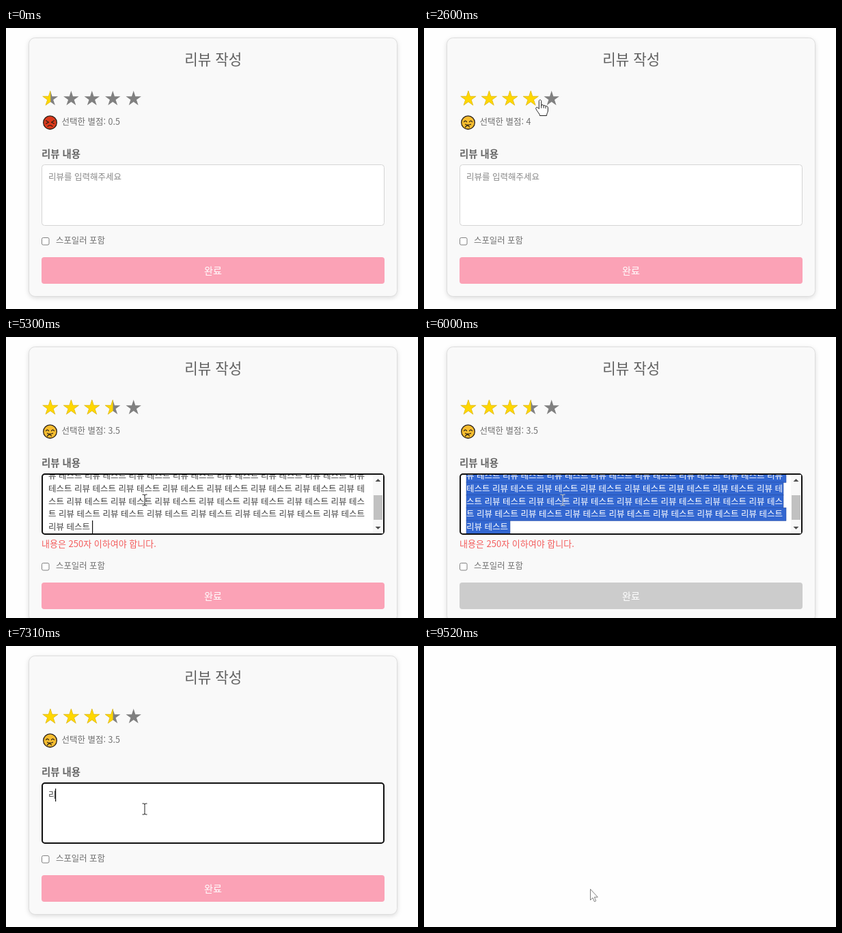
Animation of 603 by 412 pixels, one loop 9.62 s. Source, as an HTML page:

```html
<!DOCTYPE html>
<html lang="ko">
<meta charset="utf-8">
<title>리뷰 작성</title>
<style>
  html, body { margin: 0; width: 100%; height: 100%; overflow: hidden; background: #fefefe; }
  svg { display: block; }
  text { font: 12.5px "Noto Sans CJK KR", "Noto Sans CJK JP", "Noto Sans CJK", sans-serif; fill: #707070; white-space: pre; }
  #card { filter: drop-shadow(0 2px 3px #0002); }
  .line { fill: none; stroke: #2b2118; stroke-width: 1.2; stroke-linecap: round; stroke-linejoin: round; }
</style>
<svg width="603" height="412" viewBox="0 0 603 412">
  <defs>
    <clipPath id="inner"><rect x="54" y="202" width="498" height="86"/></clipPath>
    <clipPath id="rated"><rect id="ratedBox" x="50" y="88" height="30"/></clipPath>
    <path id="stars"/>
  </defs>
  <g id="form">
    <rect id="card" x="33.5" y="14.5" width="539" rx="9" fill="#f9f9f9" stroke="#ddd"/>
    <text x="303.3" y="54" text-anchor="middle" style="font-size:21.2px;fill:#606060">리뷰 작성</text>
    <use href="#stars" fill="#808080"/>
    <use href="#stars" fill="#ffd700" stroke="#e6bd10" stroke-width=".6" clip-path="url(#rated)"/>
    <g transform="translate(64.5 138.7)">
      <circle id="head" r="9.8" stroke="#2b2118" stroke-width="1.3"/>
      <path id="face" class="line"/>
    </g>
    <text id="score" x="81.5" y="141.5"></text>
    <text x="52" y="190" style="font-size:14.4px;font-weight:bold;fill:#666">리뷰 내용</text>
    <rect id="area" fill="#fff"/>
    <g clip-path="url(#inner)">
      <text id="typed" x="62" y="223"></text>
      <g id="pasted"></g>
      <rect id="caret" width="1.2" height="19" fill="#111"/>
    </g>
    <g id="scrollbar">
      <rect x="537" y="202" width="15" height="86" fill="#f8f8f8"/>
      <rect x="538" y="232" width="13" height="36" fill="#c1c1c1"/>
      <path d="M540.5 212l4-4 4 4zM540.5 278l4 4 4-4z" fill="#505050"/>
    </g>
    <text id="error" x="52" y="308" style="font-size:13px;fill:#f35c5c">내용은 250자 이하여야 합니다.</text>
    <g id="lower">
      <rect id="box" x="52.5" y="307.5" width="10.5" height="10.5" rx="2"/>
      <path id="tick" d="M55 313l2.3 2.5 4-5" fill="none" stroke="#fff" stroke-width="1.7"/>
      <text x="73" y="316" style="font-size:12.4px">스포일러 포함</text>
      <rect id="button" x="52" y="336" width="502" height="39" rx="4"/>
      <text x="303" y="361" text-anchor="middle" style="font-size:14.1px;font-weight:500;fill:#fff">완료</text>
    </g>
  </g>
  <circle id="glow" r="12.5" fill="#ffff28" opacity=".62"/>
  <path id="cursor" fill="#fff" stroke="#222" stroke-linejoin="round"/>
</svg>
<script>
const LOOP = 9620;
const $ = id => document.getElementById(id);
const set = (id, attrs) => { for (const k in attrs) $(id).setAttribute(k, attrs[k]); };
const show = (id, on) => { $(id).style.display = on ? '' : 'none'; };
const clamp = (v, lo = 0, hi = 1) => Math.min(hi, Math.max(lo, v));
const mix = (a, b, p) => `rgb(${a.map((v, i) => Math.round(v + (b[i] - v) * p))})`;

const PINK = [251, 162, 182], GRAY = [204, 204, 204], HOVER = [247, 132, 158];

const SHAPES = {
  arrow: 'M.5 .5V16.5L4 13.2 6.4 18.8 8.7 17.8 6.4 12.2H11.3Z',
  hand: 'M-1.7 13V2.2C-1.7-.2 1.7-.2 1.7 2.2V9C1.7 7 5 7 5 9.4C5 8 8 8 8 10.2C8 9 11.4 9.2 11.4 12V16C11.4 19 9.5 20 9.5 23.5H-.5C-.5 21-3 19-4.5 16.5C-6 14-7 12.5-5.6 11.5C-4.5 10.7-3 12-1.7 13.5ZM1.7 9V12.5M5 9.5V12.5M8 10.5V13',
  beam: 'M-3.5-8H-1L0-7 1-8H3.5M0-7V7M-3.5 8H-1L0 7 1 8H3.5'
};

// Upper rating limit, skin, features
const FACES = [
  [1, '#dc3a1c', 'M-6-3L-2-.5-6 1.5M6-3L2-.5 6 1.5M-3.5 5.5Q0 2.5 3.5 5.5'],
  [2, '#f0a52c', 'M-4-2.5V-1.5M4-2.5V-1.5M-4 5Q0 1.5 4 5'],
  [3, '#f3b62e', 'M-4-2.5V-1.5M4-2.5V-1.5M-4 4H4'],
  [5, '#f6bd30', 'M-6-1Q-4-4-2-1M2-1Q4-4 6-1M-4 2.5Q0 4.5 4 2.5M-4 7Q-3 4 0 4.5L2 6.5']
];

// Pointer path: time, x, y
const PATH = [
  [500, 3, 112], [1400, 188, 106], [1500, 200, 105], [1900, 54, 105], [2400, 202, 105],
  [2500, 190, 105], [2600, 170, 105], [3400, 59, 105], [3500, 55, 105], [3600, 55, 105],
  [4200, 162, 107], [4400, 162, 107], [4800, 203, 239], [7900, 203, 239],
  [8400, 190, 377], [8700, 125, 314], [8900, 125, 314], [9200, 243, 356]
];
const TYPING = [[6800, 'ㄹ', 72], [7300, '리', 72], [7400, '립', 73], [7600, '리뷰', 85]];
const CLICKS = [4200, 4800, 8800, 9200];

function pointer(t) {
  const i = PATH.findIndex(k => k[0] > t);
  if (i < 0) return PATH.at(-1).slice(1);
  const [a, b] = [PATH[Math.max(0, i - 1)], PATH[i]];
  const p = clamp((t - a[0]) / (b[0] - a[0]));
  return [a[1] + (b[1] - a[1]) * p, a[2] + (b[2] - a[2]) * p];
}

function shapeAt(x, y, t) {
  if (t >= 9500) return 'arrow';
  if (x > 50 && x < 205 && y > 90 && y < 116) return 'hand';
  if (x > 52 && x < 554 && y > 336 && y < 375) return 'hand';
  return x > 52 && x < 554 && y > 200 && y < 290 ? 'beam' : 'arrow';
}

function starPath(cx, cy) {
  let d = '';
  for (let i = 0; i < 10; i++) {
    const r = i % 2 ? 4.5 : 11.8, a = i * Math.PI / 5;
    d += `${i ? 'L' : 'M'}${cx + r * Math.sin(a)} ${cy - r * Math.cos(a)}`;
  }
  return d + 'Z';
}

function buildPasted() {
  const all = '리뷰 테스트 '.repeat(32);
  const rows = [1, 52, 102, 152, 203].map((start, i) => {
    const last = i == 4, y = 269 - 18.7 * (4 - i);
    const width = last ? 64 : i % 3 ? 464 : 468;
    return `<rect class="sel" x="62" y="${y}" width="${width}" height="19.2" fill="#3367d1" stroke="#24499b" stroke-width=".5"/>
      <text x="62" y="${y + 14}">${all.slice(start, last ? 209 : start + 50)}</text>`;
  });
  $('pasted').innerHTML = rows.join('');
}

function render(ms) {
  // The screen refreshes ten times a second, with two slight slips
  const slip = ms >= 8820 ? 20 : ms >= 6600 ? 10 : 0;
  const t = Math.floor((ms - slip) / 100) * 100;
  const [x, y] = pointer(t);

  const rating = t < 500 ? .5 : t >= 4500 ? 3.5 : clamp(Math.ceil((x - 49.6) / 15.2) / 2, .5, 5);
  set('ratedBox', { width: 30.45 * rating });
  const [, skin, face] = FACES.find(f => rating <= f[0]);
  set('head', { fill: skin });
  set('face', { d: face });
  $('score').textContent = '선택한 별점: ' + rating;

  const focus = t >= 4800 && t < 8800;
  const inset = focus ? 1 : .5;
  set('area', {
    x: 52 + inset, y: 200 + inset, width: 502 - 2 * inset, height: 90 - 2 * inset,
    rx: 4, stroke: focus ? '#101010' : '#d5d5d5', 'stroke-width': 2 * inset
  });

  const pasted = t >= 5300 && t < 6500, selected = pasted && t >= 6000;
  const typed = TYPING.findLast(k => k[0] <= t);
  $('typed').textContent = pasted ? '' : typed ? typed[1] : '리뷰를 입력해주세요';
  $('typed').style.fill = typed ? '#444' : '#888';
  ['pasted', 'scrollbar', 'error'].forEach(id => show(id, pasted));
  document.querySelectorAll('.sel').forEach(r => r.style.display = selected ? '' : 'none');
  document.querySelectorAll('#pasted text').forEach(r => {
    r.style.fill = selected ? '#fff' : '#444';
    r.style.fontWeight = selected ? 500 : 400;
  });
  set('caret', { x: pasted ? 126 : typed ? typed[2] : 62.5, y: pasted ? 269 : 209 });
  show('caret', focus && !(pasted && t >= 5800));

  set('card', { height: pasted ? 403 : 379 });
  set('lower', { transform: `translate(0 ${pasted ? 24 : 0})` });
  const checked = t >= 9000;
  set('box', { fill: checked ? '#0075ff' : '#fff', stroke: checked ? '#0075ff' : '#808080' });
  show('tick', checked);
  const gray = t < 6500 ? clamp((t - 5300) / 300) : clamp((6800 - t) / 300);
  set('button', { fill: checked ? mix(PINK, HOVER, clamp((t - 9000) / 300)) : mix(PINK, GRAY, gray) });

  show('form', t < 9500);
  const shape = shapeAt(x, y, t), place = `translate(${x} ${y})`;
  const beam = shape == 'beam';
  set('cursor', {
    d: SHAPES[shape], transform: place, fill: beam ? 'none' : '#fff',
    stroke: shape == 'arrow' ? '#808080' : beam && selected ? '#d8d0b8' : '#222'
  });
  show('cursor', t >= 500);
  set('glow', { transform: place });
  show('glow', CLICKS.includes(t));
}

set('stars', { d: [0, 1, 2, 3, 4].map(i => starPath(64.9 + 30.45 * i, 103.8)).join('') });
buildPasted();
const start = performance.now();
function frame() {
  render((performance.now() - start) % LOOP);
  requestAnimationFrame(frame);
}
frame();
</script>
</html>
```
